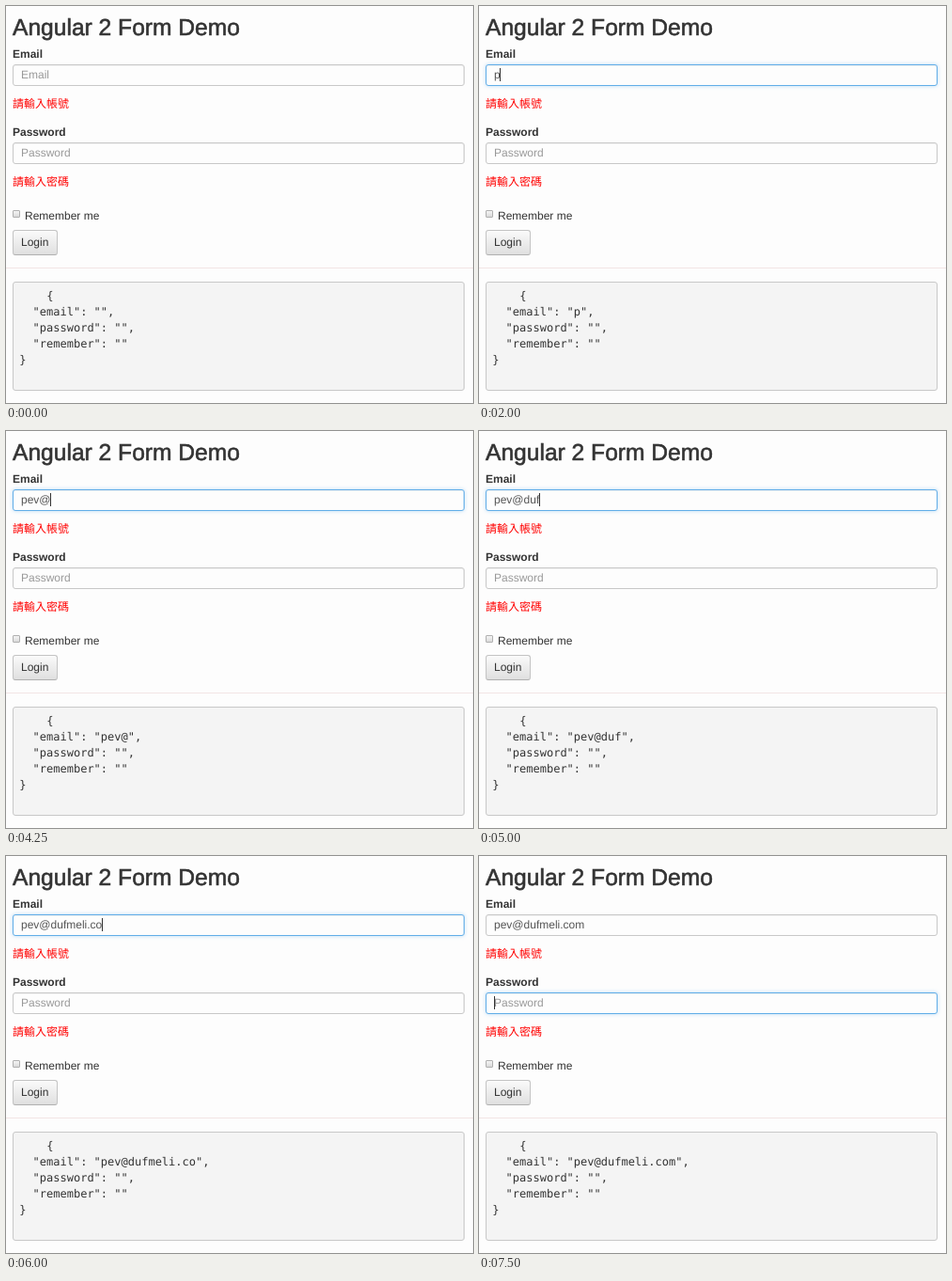
Animation of 497 by 422 pixels, one loop 8 s. Source, as an HTML page:

```html
<!DOCTYPE html>
<html lang="en">
<head>
<meta charset="utf-8">
<title>Form demo</title>
<style>
  html, body { margin: 0; width: 100%; height: 100%; overflow: hidden; background: #fdfdfd; }
  #stage { position: relative; width: 497px; height: 422px; overflow: hidden; }
  #stage > * { position: absolute; box-sizing: border-box; }
  .input {
    left: 7px; width: 481px; height: 23px;
    background: #fdfdfd; border: 1px solid #c8c8c8; border-radius: 3px;
    box-shadow: inset 0 1px 1px rgba(0, 0, 0, .05);
  }
  .input.rising { border-color: #a9c4da; }
  .input.focus {
    border-color: #62aee8;
    box-shadow: inset 0 1px 1px rgba(0, 0, 0, .05), 0 0 4px rgba(82, 168, 236, .4);
  }
  #email { top: 62px; }
  #password { top: 145px; }
  #check {
    left: 7px; top: 217px; width: 8px; height: 8px;
    border: 1px solid #b0b0b0; border-radius: 1px;
    background: linear-gradient(#f4f4f4, #dadada);
  }
  #login {
    left: 7px; top: 238px; width: 48px; height: 27px;
    border: 1px solid #c4c4c4; border-bottom-color: #b0b0b0; border-radius: 3px;
    background: linear-gradient(#fafafa, #dfdfdf);
  }
  #rule { left: 0; top: 278px; width: 497px; height: 1px; background: #f3e4e5; }
  #json {
    left: 7px; top: 293px; width: 481px; height: 116px;
    border: 1px solid #c8c8c8; border-radius: 3px; background: #f4f4f4;
  }
  svg { left: 0; top: 0; }
  text {
    font: 12px "Liberation Sans", Arial, sans-serif; fill: #333;
    text-rendering: geometricPrecision;
  }
  .title { font-size: 24.6px; stroke: #333; stroke-width: .6px; }
  .label { font-weight: bold; }
  .hint { fill: #999; }
  .value { fill: #555; }
  .error { font-family: "Noto Sans CJK TC", "Noto Sans CJK", sans-serif; font-weight: 300; fill: #f00; }
  .code text { font-family: "DejaVu Sans Mono", monospace; }
</style>
</head>
<body>
<div id="stage">
  <div id="email" class="input"></div>
  <div id="password" class="input"></div>
  <div id="check"></div>
  <div id="login"></div>
  <div id="rule"></div>
  <div id="json"></div>
  <svg width="497" height="422">
    <text class="title" x="7" y="31">Angular 2 Form Demo</text>
    <text class="label" x="7" y="55">Email</text>
    <text id="value" x="16" y="77"></text>
    <text class="error" x="7" y="108">請輸入帳號</text>
    <text class="label" x="7" y="138">Password</text>
    <text class="hint" x="16" y="160">Password</text>
    <text class="error" x="7" y="191">請輸入密碼</text>
    <text x="20" y="227">Remember me</text>
    <text x="16" y="255">Login</text>
    <g class="code">
      <text x="43.3" y="312">{</text>
      <text id="line" x="28.6" y="329"></text>
      <text x="28.6" y="346">"password": "",</text>
      <text x="28.6" y="363">"remember": ""</text>
      <text x="14.3" y="380">}</text>
    </g>
    <rect id="caret" width="1" height="14" fill="#333"/>
  </svg>
</div>
<script>
  const LOOP = 8000;
  const ADDRESS = 'pev@dufmeli.com';

  // [start ms, characters typed, caret visible]
  const STEPS = [
    [0, 0, 0], [500, 0, 1], [1000, 1, 1], [1500, 1, 0], [2000, 1, 1], [2500, 1, 0],
    [3000, 2, 1], [3500, 3, 1], [4000, 3, 0], [4250, 4, 1], [4750, 5, 1], [5000, 7, 1],
    [5250, 9, 1], [5500, 10, 1], [5750, 12, 1], [6000, 14, 1], [6250, 15, 1],
    [6750, 15, 0], [7250, 15, 1]
  ];
  const FOCUS = 500, GLOW = 750, TAB = 7500;

  const $ = id => document.getElementById(id);
  const email = $('email'), password = $('password');
  const value = $('value'), line = $('line'), caret = $('caret');

  function draw(t) {
    const [, count, caretOn] = STEPS.findLast(step => step[0] <= t);
    const typed = ADDRESS.slice(0, count);
    const tabbed = t >= TAB;

    value.textContent = typed || 'Email';
    value.setAttribute('class', typed ? 'value' : 'hint');
    line.textContent = `"email": "${typed}",`;

    email.classList.toggle('rising', t >= FOCUS && t < GLOW);
    email.classList.toggle('focus', t >= GLOW && !tabbed);
    password.classList.toggle('focus', tabbed);

    const width = typed && !tabbed ? value.getComputedTextLength() : 0;
    caret.setAttribute('x', Math.floor(16 + width));
    caret.setAttribute('y', tabbed ? 149 : 66);
    caret.setAttribute('visibility', caretOn ? 'visible' : 'hidden');
  }

  const start = performance.now();
  function tick() {
    draw((performance.now() - start) % LOOP);
    requestAnimationFrame(tick);
  }
  tick();
</script>
</body>
</html>
```
